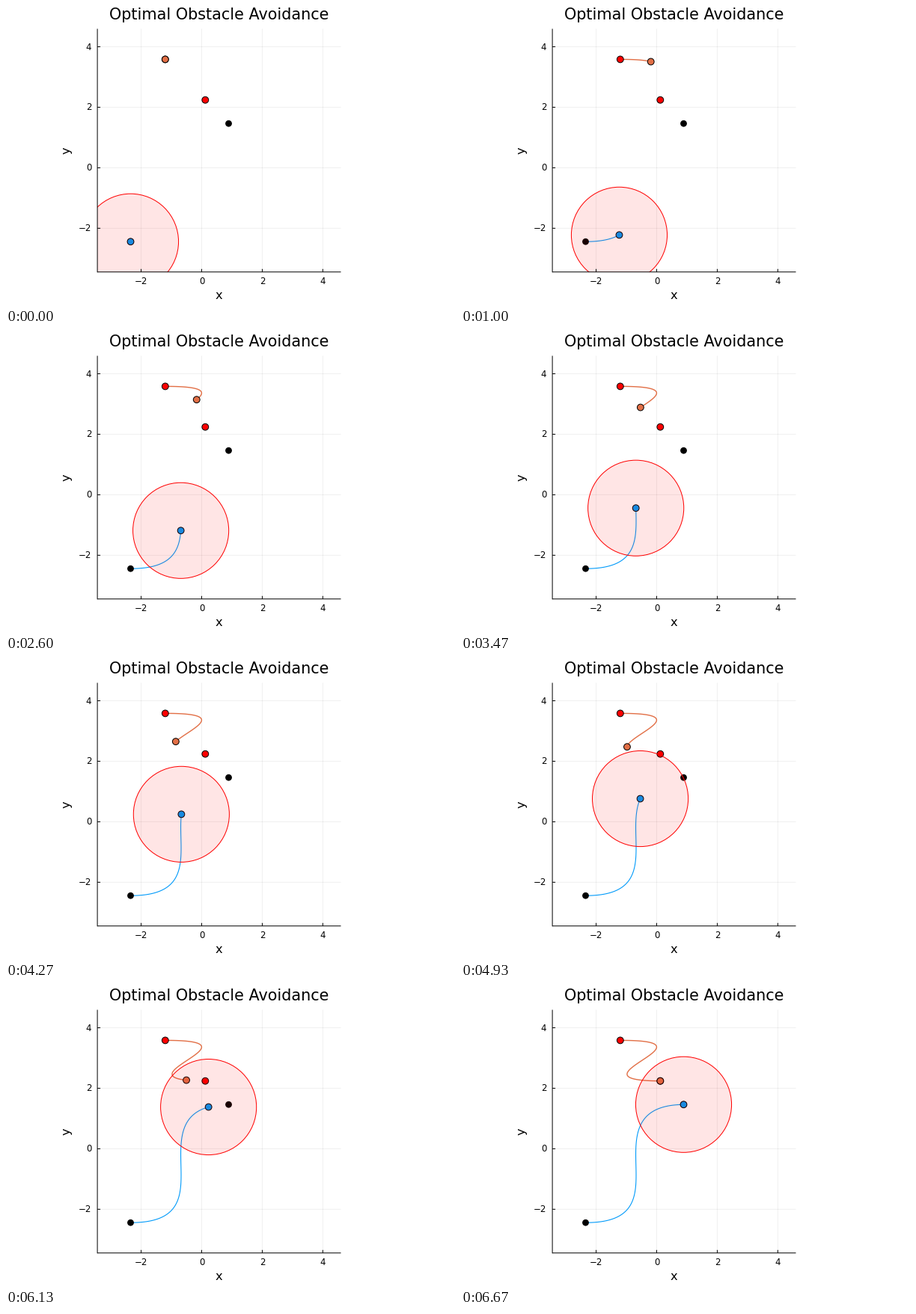
Animation of 600x400 px, one loop 6.74 s. Source, as a matplotlib script:

```python
import numpy as np
import matplotlib
import matplotlib.pyplot as plt
from matplotlib.animation import FuncAnimation
from matplotlib.patches import Circle, Rectangle

matplotlib.rcParams["font.family"] = "DejaVu Sans"

W, H, DPI = 600, 400, 100
PT = 72 / DPI                      # points per pixel
LOOP, TICK = 6740, 20              # ms
FPS, LAST = 15, 100                # pose rate and final pose
LEFT, RIGHT, TOP, BOTTOM = 122.1, 447.5, 30.5, 355.8
X0, Y0, UNIT = 261.5, 216.4, 40.47  # origin and scale of the plot
BLUE, ORANGE = "#009AFA", "#E26F46"

fig = plt.figure(figsize=(W / DPI, H / DPI), dpi=DPI, facecolor="white")
ax = fig.add_axes([0, 0, 1, 1])
ax.set_xlim(0, W)
ax.set_ylim(H, 0)
ax.axis("off")

frame_box = Rectangle((LEFT, TOP), RIGHT - LEFT, BOTTOM - TOP,
                      fc="none", ec="none")
ax.add_patch(frame_box)


def rule(xs, ys, z, alpha=1):
    ax.plot(xs, ys, color="black", alpha=alpha, lw=PT, zorder=z,
            solid_capstyle="butt", snap=False)


def label(x, y, text, size, ha="center", rotation=0):
    ax.text(x, y, text, fontsize=size * PT, ha=ha, va="baseline",
            rotation=rotation, rotation_mode="anchor", color="black")


def disc(pos, color, z):
    edge = "none" if color == "black" else "black"
    return ax.add_patch(Circle(pos, 4.4, fc=color, ec=edge, lw=PT, zorder=z))


def hermite(p0, p1, v0, v1, bump, s):
    """Cubic between two states plus a small mid-way deviation."""
    return (p0 + (p1 - p0) * s**2 * (3 - 2 * s)
            + v0 * s * (1 - s)**2 - v1 * s**2 * (1 - s)
            + bump * (s * (1 - s))**2)


def pursuer(s):
    return (hermite(166.5, 297.5, 411.7, 397.3, 0, s),
            hermite(315.25, 157.25, 0, -3, 37, s))


def evader(s):
    return (hermite(212.8, 266.3, 417, 395, 0, s),
            hermite(71.4, 125.7, -1, 1, -6, s))


# Axes, grid and text
for v in (-2, 0, 2, 4):
    x, y = X0 + UNIT * v, Y0 - UNIT * v
    rule([x, x], [TOP, BOTTOM], 0, alpha=0.06)
    rule([LEFT, RIGHT], [y, y], 0, alpha=0.06)
    rule([x, x], [BOTTOM, BOTTOM - 4], 9)
    rule([LEFT, LEFT + 4], [y, y], 9)
    name = str(v).replace("-", "\u2212")
    label(x, 371.6, name, 11.8)
    label(114.2, y + 4, name, 11.8, ha="right")
rule([LEFT, LEFT], [TOP, BOTTOM + 0.5], 9)
rule([LEFT, RIGHT], [BOTTOM, BOTTOM], 9)
label(284.7, 18, "Optimal Obstacle Avoidance", 20.8)
label(284.7, 391.7, "x", 16.2)
label(85.6, 193, "y", 16.2, rotation=90)

# Start and goal marks
for path, color in ((pursuer, "black"), (evader, "red")):
    for s in (0, 1):
        disc(path(s), color, 3)

movers = []
for path, color, width in ((pursuer, BLUE, 1.1), (evader, ORANGE, 1.4)):
    trail, = ax.plot([], [], color=color, lw=width * PT, zorder=2)
    movers.append((path, trail, disc(path(0), color, 4)))

zone = Circle(pursuer(0), 64.05, fc=(1, 0, 0, 0.1), ec="red", lw=PT, zorder=6)
ax.add_patch(zone)
zone.set_clip_path(frame_box)


def draw(i):
    # Poses change 15 times a second; sample 15 ms into each tick.
    k = min(int((i * TICK + 15) * FPS / 1000), LAST)
    s = np.arange(k + 1) / LAST
    for path, trail, dot in movers:
        xs, ys = path(s)
        trail.set_data(xs, ys)
        dot.center = xs[-1], ys[-1]
    zone.center = pursuer(s[-1])
    return [zone] + [a for m in movers for a in m[1:]]


anim = FuncAnimation(fig, draw, frames=LOOP // TICK, interval=TICK,
                     repeat=True, repeat_delay=0, blit=False)
plt.show()
```
